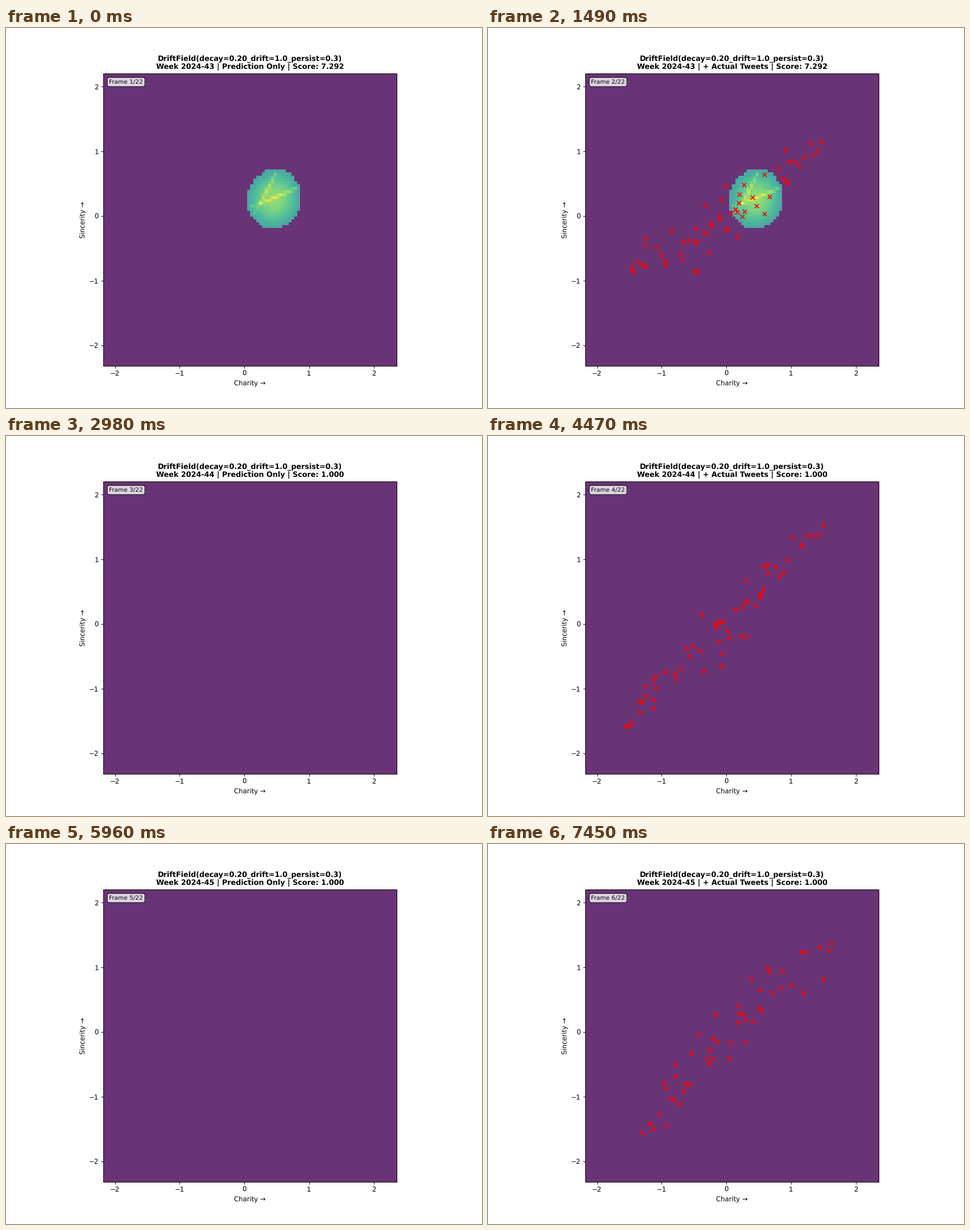
These frames come from a looping animation (837 px wide and 669 px high, 8 s). A matplotlib script:

```python
import numpy as np
import matplotlib.pyplot as plt
from matplotlib.animation import FuncAnimation

W, H, DPI = 837, 669, 83.7
LOOP, STEP, HOLD = 8000, 40, 1490
LEFT, BOTTOM, WIDE, TALL = 171, 74, 516, 515   # plot area in pixels
XLIM, YLIM = (-2.181, 2.355), (-2.318, 2.206)
N = 100                                        # cells along each side
SCORES = (7.292, 1.0, 1.0)


def cloud(seed, count, low, mid, high):
    """Scatter around a curve from low through mid to high, widest at mid."""
    low, mid, high = map(np.array, (low, mid, high))
    u = np.linspace(-1, 1, count)[:, None]
    s = 0.75 * u + 0.25 * u ** 3
    curve = mid + (high - low) / 2 * s + ((high + low) / 2 - mid) * s ** 2
    noise = np.random.default_rng(seed).normal(0, 0.2, (count, 2))
    return curve + noise.clip(-0.4, 0.4) * np.sqrt(1 - u ** 4)


def ray(x, y, start, end, gain):
    """Soft line between two cells, strongest where it crosses a cell centre."""
    (x0, y0), (x1, y1) = start, end
    dx, dy = x1 - x0, y1 - y0
    t = np.clip(((x - x0) * dx + (y - y0) * dy) / (dx * dx + dy * dy), 0, 1)
    dist = np.hypot(x - x0 - t * dx, y - y0 - t * dy)
    return gain * np.clip(1 - 1.2 * dist, 0, 1)


def drift_field():
    y, x = np.mgrid[0:N, 0:N] + 0.5
    dy = y - 57
    r2 = ((x - 58.13 - 0.05 * dy) / 9.1) ** 2 + (dy / 10.2) ** 2
    hub = (53.5, 55.5)
    field = 0.8 * np.exp(-0.5 * r2)
    field += np.maximum.reduce([
        ray(x, y, hub, (58.5, 65.5), 0.15),
        ray(x, y, hub, (65.5, 60.5), 0.17),
        ray(x, y, hub, (50.5, 54.5), 0.12),
        ray(x, y, hub, (51.5, 52.5), 0.1),
    ])
    field[55, 53] = 1
    return np.where(r2 < 1, field, 0)


EMPTY = np.zeros((N, N))
FIELDS = (drift_field(), EMPTY, EMPTY)
POINTS = (
    cloud(4, 60, (-1.44, -0.85), (-0.02, -0.08), (1.48, 1.15)),
    cloud(7, 59, (-1.56, -1.58), (-0.06, -0.05), (1.50, 1.54)),
    cloud(11, 50, (-1.30, -1.55), (-0.02, 0.0), (1.61, 1.37)),
)
NONE = np.empty((0, 2))

plt.rcParams.update({"font.family": "DejaVu Sans", "text.hinting": "none"})
fig = plt.figure(figsize=((W + 1e-6) / DPI, (H + 1e-6) / DPI), dpi=DPI,
                 facecolor="white")
ax = fig.add_axes([LEFT / W, BOTTOM / H, WIDE / W, TALL / H])
image = ax.imshow(FIELDS[0], origin="lower", extent=XLIM + YLIM, vmin=0, vmax=1,
                  cmap="viridis", alpha=0.8, interpolation="nearest",
                  aspect="auto")
marks = ax.scatter([], [], c="red", marker="x", s=40, linewidths=1.5)
ax.set(xlim=XLIM, ylim=YLIM, xticks=range(-2, 3), yticks=range(-2, 3),
       xlabel="Charity →", ylabel="Sincerity →")
title = ax.set_title("", fontsize=11, fontweight="bold")
counter = ax.text(0.02, 0.98, "", transform=ax.transAxes, fontsize=9, va="top",
                  bbox=dict(boxstyle="round,pad=0.3", facecolor="white", alpha=0.8))


def update(i):
    # The offset makes each change fall in the step that contains it.
    scene = min((i * STEP + 30) // HOLD, 5)
    week, actual = divmod(scene, 2)
    image.set_data(FIELDS[week])
    marks.set_offsets(POINTS[week] if actual else NONE)
    stage = "+ Actual Tweets" if actual else "Prediction Only"
    title.set_text("DriftField(decay=0.20_drift=1.0_persist=0.3)\n"
                   f"Week 2024-{43 + week} | {stage} | Score: {SCORES[week]:.3f}")
    counter.set_text(f"Frame {scene + 1}/22")
    return image, marks, title, counter


anim = FuncAnimation(fig, update, frames=LOOP // STEP, interval=STEP,
                     repeat=True, repeat_delay=0, blit=False)
plt.show()
```
